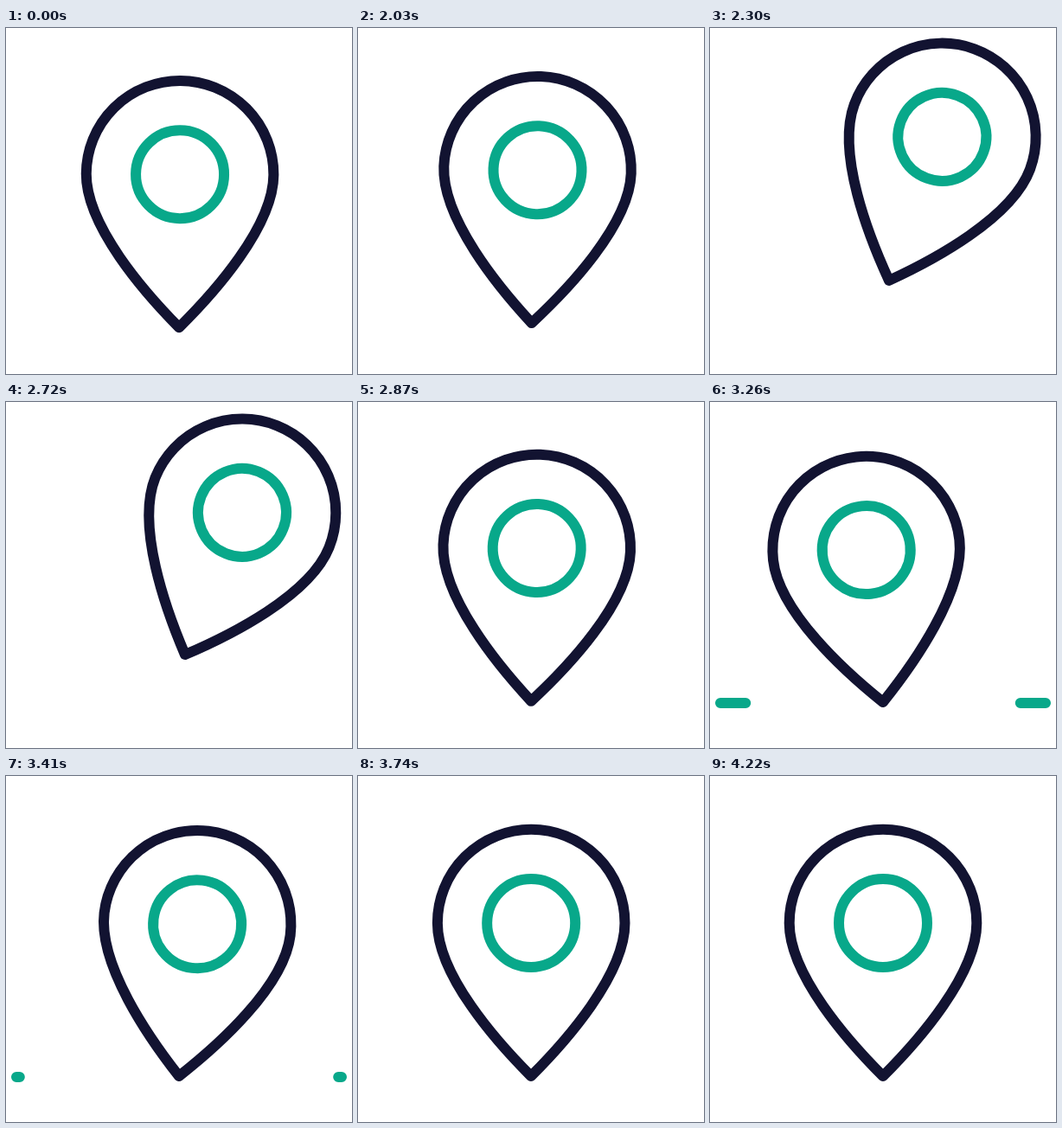
Animation of 400x400 px, one loop 4250 ms. Source, as an HTML page:

```html
<!DOCTYPE html>
<html lang="en">
<head>
<meta charset="utf-8">
<title>Location pin</title>
<style>
  html, body { margin: 0; width: 100%; height: 100%; overflow: hidden; background: #fff; }
  svg { display: block; width: 100%; height: 100%; }
  svg * { fill: none; stroke: #08a88a; stroke-width: 12; stroke-linecap: round; stroke-linejoin: round; }
  .outline { stroke: #121331; }
</style>
</head>
<body>
<svg viewBox="0 0 400 400">
  <path id="dashes"/>
  <g id="pin">
    <path class="outline" d="M0 0C-40 -40 -108.3 -117 -108.3 -177A108.3 108.3 0 0 1 108.3 -177C108.3 -117 40 -40 0 0Z"/>
    <circle cy="-177" r="51"/>
  </g>
</svg>
<script>
const LOOP = 4250, STEP = 30, REST = 2000;
const pin = document.getElementById('pin');
const dashes = document.getElementById('dashes');

const smooth = u => u * u * (3 - 2 * u);
const easeOut = u => 1 - (1 - u) ** 2;

// Cubic easing through (x1, 0) and (x2, 1)
function leap(u, x1 = 0.16, x2 = 0.1) {
  let lo = 0, hi = 1;
  for (let i = 0; i < 24; i++) {
    const s = (lo + hi) / 2, r = 1 - s;
    if (3 * x1 * s * r * r + 3 * x2 * s * s * r + s ** 3 < u) lo = s; else hi = s;
  }
  return smooth(lo);
}

// Each key: [time, value, easing towards it]
function track(keys, t) {
  const next = keys.findIndex(key => key[0] > t);
  if (next < 0) return keys[keys.length - 1][1];
  if (next === 0) return keys[0][1];
  const [t0, v0] = keys[next - 1], [t1, v1, ease] = keys[next];
  return v0 + (v1 - v0) * ease((t - t0) / (t1 - t0));
}

const tilt = [[1980, 0], [2660, 24.4, leap], [3065, -17.8, smooth],
  [3510, 10.5, smooth], [3867, -4.2, smooth], [4220, 0, smooth]];
const lift = [[1980, 0], [2660, 66.3, leap], [2888, 0, smooth]];
const head = [[2870, 10], [3213, 188, easeOut]];
const tail = [[2915, 10], [3495, 188, easeOut]];

function draw(t) {
  const h = track(lift, t);
  pin.setAttribute('transform',
    `translate(${200 + 0.127 * h} ${347 - h}) rotate(${track(tilt, t)})`);
  const a = track(tail, t), b = track(head, t);
  dashes.setAttribute('d', b > a
    ? `M${200 - a} 348H${200 - b}M${200 + a} 348H${200 + b}` : '');
}

const start = performance.now();
function tick() {
  const t = (performance.now() - start) % LOOP;
  const steps = Math.floor((t - REST) / STEP);
  draw(REST + STEP * Math.max(0, steps));
  requestAnimationFrame(tick);
}
tick();
</script>
</body>
</html>
```
